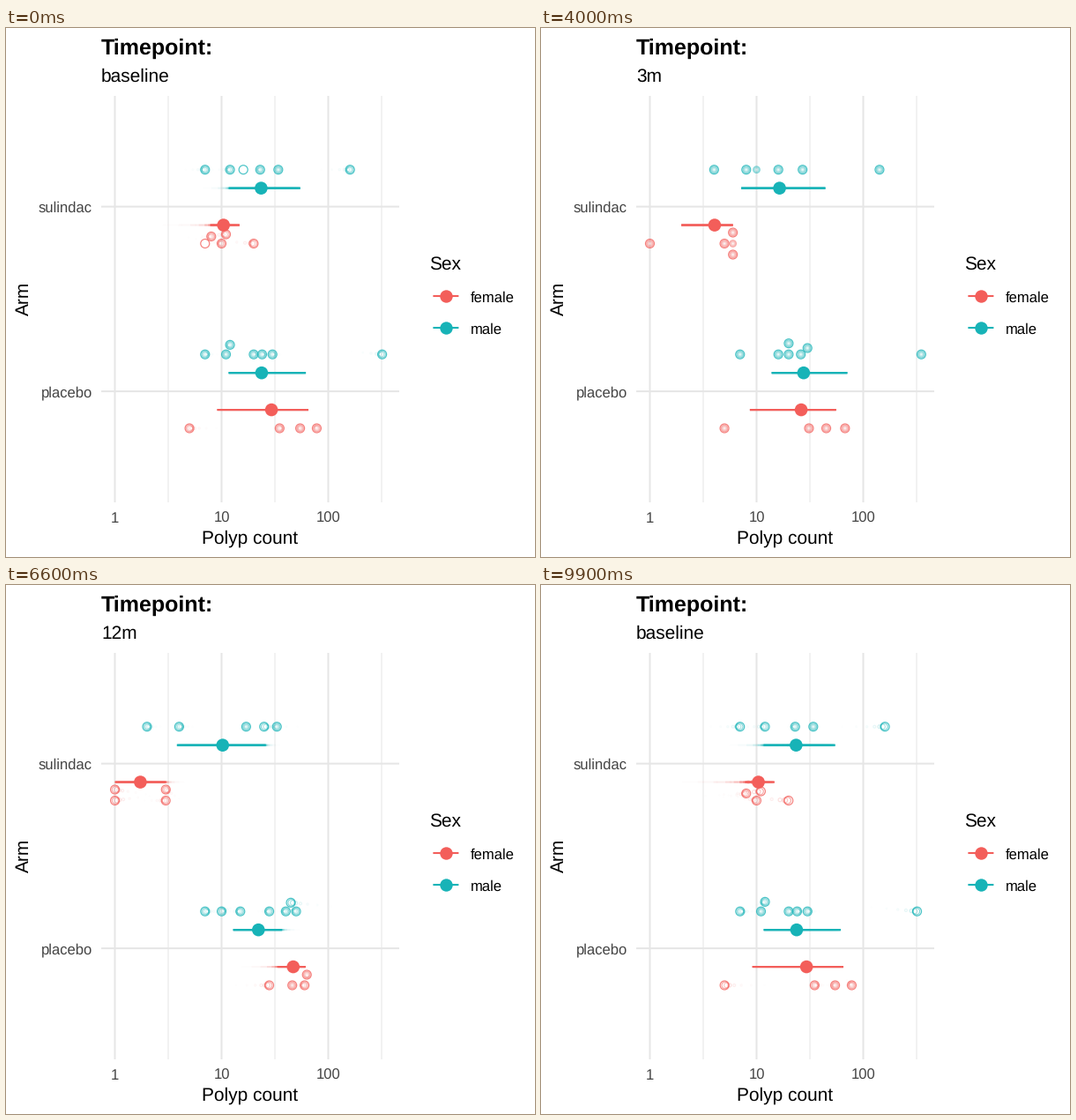
Recreate the animation shown at these times as a matplotlib script. Size 600 by 600 pixels, loop 10 s.

```python
import matplotlib.pyplot as plt
from matplotlib.animation import FuncAnimation
from matplotlib.collections import LineCollection
from matplotlib.colors import to_rgb
import numpy as np

plt.rcParams["font.family"] = "Liberation Sans"
plt.rcParams["text.hinting"] = "no_hinting"

FRAMES, WAKE = 100, 10
PX = 0.72  # points per pixel at 100 dpi
RED, TEAL, GRID, GREY = "#F35E5A", "#17B3B7", "#E6E6E6", "#444444"
STATES = ("baseline", "3m", "12m")
MOVES = ((16, 33), (50, 67), (84, 100))  # transition into the next state
LEAVE = 50  # drop-outs are present before this frame
LEFT, DECADE = 123.5, 121
ROW, PITCH = 202.6, 209.5
ARMS = ("sulindac", "placebo")
SEXES = (("female", RED, 1), ("male", TEAL, -1))

# Polyp counts of each subject at the three visits; a pair marks a drop-out.
COUNTS = {
    ("sulindac", "male"): [(7, 4, 2), (12, 8, 4), (16, 10), (23, 16, 17),
                           (34, 27, 33), (160, 142, 25)],
    ("sulindac", "female"): [(8, 1, 3), (7, 6), (11, 6, 1), (20, 5, 1), (10, 6, 3)],
    ("placebo", "male"): [(7, 7, 15), (12, 20, 7), (11, 20, 10), (20, 16, 28),
                          (24, 26, 40), (30, 30, 50), (320, 350, 44.5)],
    ("placebo", "female"): [(5, 5, 28), (35, 31, 60), (54.5, 45, 46), (78, 67.5, 63)],
}

rng = np.random.default_rng(1)


def log_x(v):
    return LEFT + DECADE * np.log10(v)


def swarm(xs, rx=9.2, ry=12.5):
    """Vertical offsets that keep neighbours apart, nearest the row first."""
    placed, dy = [], np.zeros(len(xs))
    for k in np.argsort(xs, kind="stable"):
        near = [(abs(xs[k] - x) / rx, y) for x, y in placed if abs(xs[k] - x) < rx]
        gaps = [(y, ry * np.sqrt(1 - u * u)) for u, y in near]
        options = [0] + [y + sign * g for y, g in gaps for sign in (-1, 1)]
        free = [o for o in options if all(abs(o - y) > g - 0.01 for y, g in gaps)]
        dy[k] = min(free, key=abs)
        placed.append((xs[k], dy[k]))
    return dy


def mean_range(xs, draws=20000):
    """Mean with its bootstrap 95 % interval."""
    means = rng.choice(xs, (draws, len(xs))).mean(axis=1)
    lo, hi = np.quantile(means, (0.025, 0.975))
    return lo, xs.mean(), hi


def build():
    rings, stays, ring_rgb, means, mean_y, mean_rgb = [], [], [], [], [], []
    for a, arm in enumerate(ARMS):
        for sex, color, side in SEXES:
            subjects = COUNTS[arm, sex]
            stay = np.array([len(s) == 3 for s in subjects])
            x = log_x(np.array([(s + s[-1:])[:3] for s in subjects]))
            y = np.full(x.shape, ROW + PITCH * (a + 0.2 * side))
            ranges = []
            for v in range(3):
                here = stay | (v < 2)
                y[here, v] += swarm(x[here, v])
                ranges.append(mean_range(x[here, v]))
            rings.append(np.stack([x, y], axis=-1))
            stays.append(stay)
            ring_rgb += [to_rgb(color)] * len(x)
            means.append(ranges)
            mean_y.append(ROW + PITCH * (a + 0.1 * side))
            mean_rgb.append(to_rgb(color))
    return (np.concatenate(rings), np.concatenate(stays), np.array(ring_rgb),
            np.array(means), mean_y, np.array(mean_rgb))


RINGS, STAYS, RING_RGB, MEANS, MEAN_Y, MEAN_RGB = build()


def phase(i):
    for s, (a, b) in enumerate(MOVES):
        if i < b:
            return s, max(0, (i - a) / (b - a))


def ease(t):
    return 4 * t ** 3 if t < 0.5 else 1 - 4 * (1 - t) ** 3


def pose(data, i):
    s, t = phase(i)
    a, b = data[:, s], data[:, (s + 1) % 3]
    return a + (b - a) * ease(t)


def rgba(rgb, alpha):
    return np.column_stack([rgb, np.full(len(rgb), alpha)])


def area(radius):
    return (2 * radius * PX) ** 2


fig = plt.figure(figsize=(6, 6), dpi=100, facecolor="white")
ax = fig.add_axes([0, 0, 1, 1])
ax.set(xlim=(0, 600), ylim=(600, 0))
ax.axis("off")


def line(xs, ys, color, width, z):
    ax.plot(xs, ys, color=color, lw=width * PX, zorder=z,
            solid_capstyle="butt", snap=False)


def label(x, y, text, size=15, color="black", **kw):
    return ax.text(x, y, text, fontsize=size, color=color, va="baseline", **kw)


for k in range(6):
    x = LEFT + DECADE / 2 * k
    line([x, x], [77, 538], GRID, 1 if k % 2 else 2, 0)
    if k % 2 == 0:
        label(x, 561, str(10 ** (k // 2)), 12, GREY, ha="center")
for a, arm in enumerate(ARMS):
    y = ROW + PITCH * a
    line([108, 446], [y, y], GRID, 2, 0)
    label(98, y + 6.4, arm, 12, GREY, ha="right")

label(108, 30, "Timepoint:", 18, weight="bold")
subtitle = label(108, 61, "")
label(277, 585, "Polyp count", ha="center")
label(26, 307, "Arm", ha="center", rotation=90, rotation_mode="anchor")

label(480.5, 274, "Sex")
for k, (sex, color, _) in enumerate(SEXES):
    y = 304 + 36 * k
    line([484.4, 513.4], [y, y], color, 2.1, 1)
    ax.scatter([498.9], [y], s=area(7.2), color=color, lw=0, zorder=2)
    label(527, y + 7, sex, 12)

circles = ax.scatter([], [], lw=1.2 * PX, zorder=3)
bars = ax.add_collection(LineCollection([], lw=2.1 * PX, zorder=4,
                                        capstyle="butt", snap=False), autolim=False)
dots = ax.scatter([], [], lw=0, zorder=5)


def draw(i):
    s, t = phase(i)
    subtitle.set_text(STATES[(s + (t > 0.53)) % 3])
    if 40 <= i < 52:  # the second visit rests on its last pose
        i = LEAVE

    ring_xy, ring_size, ring_col = [], [], []
    segs, dot_xy, dot_size, mean_col = [], [], [], []
    for age in range(WAKE - 1, -1, -1):
        j = (i - age) % FRAMES
        f = (1 - age / WAKE) ** 3
        seen = STAYS | (j < LEAVE)
        xy = pose(RINGS, j)[seen]
        ring_xy.append(xy)
        ring_size += [area(0.49 + 4.5 * f)] * len(xy)
        ring_col.append(rgba(RING_RGB[seen], 0.78 * f ** 1.3))

        for (lo, mid, hi), y in zip(pose(MEANS, j), MEAN_Y):
            segs.append([(lo, y), (hi, y)])
            dot_xy.append((mid, y))
            dot_size.append(area(1 + 6.3 * f))
        mean_col.append(rgba(MEAN_RGB, f))

    circles.set_offsets(np.vstack(ring_xy))
    circles.set_sizes(ring_size)
    circles.set_facecolor("none")
    circles.set_edgecolor(np.vstack(ring_col))
    bars.set_segments(segs)
    bars.set_color(np.vstack(mean_col))
    dots.set_offsets(dot_xy)
    dots.set_sizes(dot_size)
    dots.set_facecolor(np.vstack(mean_col))
    return subtitle, circles, bars, dots


anim = FuncAnimation(fig, draw, frames=FRAMES, interval=100, repeat=True)
plt.show()
```
